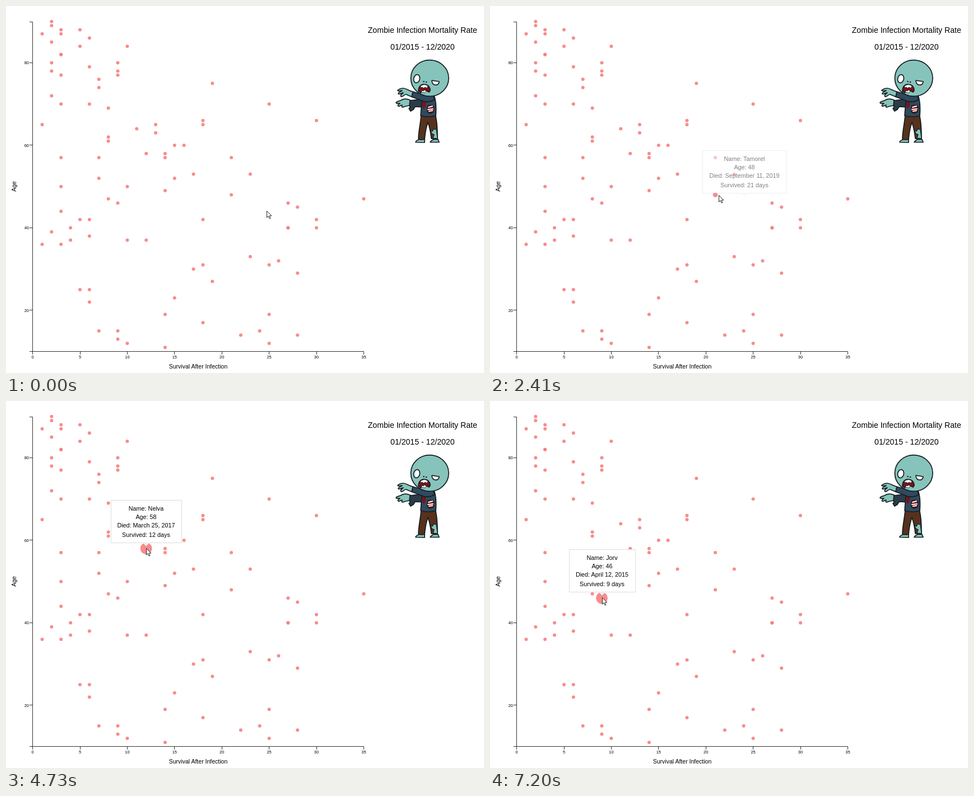
An HTML page for the animation above (8000 ms loop, 853x656 px).

```html
<!DOCTYPE html>
<html lang="en">
<head>
<meta charset="utf-8">
<title>Zombie Infection Mortality Rate</title>
<style>
  html, body { margin: 0; width: 100%; height: 100%; overflow: hidden; background: #fff; }
  svg { display: block; font-family: "Liberation Sans", Arial, sans-serif; text-anchor: middle; }
  #axes path { fill: none; stroke: #000; stroke-width: .8; }
  #axes text { font-size: 7.5px; }
  .label { font-size: 10.5px; }
  .title { font-size: 14.1px; }
  #dots { fill: #f77f7f; fill-opacity: .9; }
  #tip { font-size: 10.8px; }
  #tip rect { fill: #fff; stroke: #ddd; }
  #zombie { stroke: #141c20; stroke-width: 1.7; stroke-linejoin: round; stroke-linecap: round; }
  .skin { fill: #86c4bb; }
  .coat { fill: #2f4a5e; }
  .rag { fill: #2b3b48; }
  .blood { fill: #7a1219; }
  .trousers { fill: #57321d; }
  .white { fill: #fff; }
</style>
</head>
<body>
<svg width="853" height="656" viewBox="0 0 853 656">
  <g id="axes"></g>
  <text class="label" x="343" y="648">Survival After Infection</text>
  <text class="label" transform="translate(17.5 322.5) rotate(-90)">Age</text>
  <text class="title" x="743.3" y="47.5">Zombie Infection Mortality Rate</text>
  <text class="title" x="743.3" y="77.5">01/2015 - 12/2020</text>

  <g id="zombie">
    <path class="skin" d="M731 243.5c0-3 4-4 7-5h9v5.500zM757 243.500c1-3 4-4 6-5h8l2 5z"/>
    <path class="trousers" d="M741 194c-1 15-5 29-5 44q6 2 11 0c1-11 3-22 6-30 3 9 5 19 6 29l11 1c0-15 0-30-4-44z"/>
    <path class="skin" d="M757 222l4 2 2-4 5 1 2 16-8-1 2-6-4-2z" stroke-width="1.2"/>
    <path class="rag" d="M746 166l-26 3-1 9 3 2-3 3 3 5 5-3 3-5 16 1z"/>
    <path class="skin" d="M721 168c-7-3-13-2-17 1-3 1-8 2-8 4 1 2 5 1 7 1-2 2-5 3-3 5 2 1 5-2 7-2-1 2-1 4 1 4 3-1 4-2 12-3z"/>
    <path class="coat" d="M745 160c-4 12-4 23-5 36q14 4 27 0c1-13 1-25-3-36z"/>
    <path class="blood" d="M744 169l6 1-1 8-3 6-3-2z" stroke="none"/>
    <path class="coat" d="M748 159l-23-6-2 9 24 9q12 1 18-4l-3-8z"/>
    <path class="skin" d="M726 153c-8-1-11-6-17-6-4 0-9 2-10 4 1 2 5 0 8 0-3 2-8 4-7 6 2 2 6-2 9-2-3 2-6 5-4 7 3 1 5-4 9-4 4 2 7 3 10 4z"/>
    <path class="blood" d="M752 179c4-3 10-2 12 1l-1 9q-6 5-11 0z" stroke-width="1.2"/>
    <path d="M754 181l7-2M753 185l9-1M755 188l6-1" stroke="#fff" stroke-width="2"/>
    <ellipse class="skin" cx="756.2" cy="129" rx="33.800" ry="32.300"/>
    <ellipse class="white" cx="733" cy="130" rx="5.4" ry="7.5" transform="rotate(12 733 130)"/>
    <path class="white" d="M760 133l13 2c0 4-3 7-7 6-4 0-6-4-6-8z"/>
    <path d="M745.5 135h.1M750 136h.1" stroke-width="2.4"/>
    <path class="blood" d="M736 152c0-8 5-13 11-12 6 0 10 5 10 11l-2 3-4-2q-6-2-11 3z"/>
    <path class="white" d="M740 143q6-5 13 0l-2 4-3-2-3 2-2-2-3 1zM741 154l2-3 2 1 2-2 3 2-2 3z" stroke-width=".8"/>
  </g>

  <g id="dots"></g>
  <g id="tip">
    <rect y="-86.5" height="76"/>
    <path d="M-6-10.5H6L0-4.5z" fill="#f2f2f2"/>
    <text y="-68.5"></text><text y="-53.5"></text><text y="-38"></text><text y="-21"></text>
  </g>
  <path id="cursor" d="M.5.5V12.2l2.7-2.5 2 4.400 1.800-.8-2-4.300H8.900z" fill="#fff" stroke="#111" stroke-width=".9"/>
</svg>

<script>
const $ = id => document.getElementById(id);
const px = days => 47.6 + days * 16.88;
const py = age => 617.7 - (age - 10) * 7.375;
const pixel = v => Math.floor(v) + .5;

function add(parent, tag, attrs, text = '') {
  const el = document.createElementNS('http://www.w3.org/2000/svg', tag);
  for (const key in attrs) el.setAttribute(key, attrs[key]);
  el.textContent = text;
  return parent.appendChild(el);
}

// The plotted data: ages at death, indexed by days survived.
const ages = [
  [], [87, 65, 36], [90, 89, 85, 80, 78, 72, 39],
  [88, 87, 82, 82, 77, 70, 57, 50, 44, 36], [40, 37], [88, 84, 42, 25],
  [86, 79, 70, 42, 38, 25, 22], [76, 74, 57, 52, 15], [69, 62, 61, 47],
  [80, 78, 77, 46, 15, 13], [84, 50, 37, 12], [64], [58, 37], [65, 63],
  [58, 57, 49, 19, 11], [60, 52, 23], [60], [53, 30], [66, 65, 42, 31, 17],
  [75, 27], [], [57, 48], [14], [53, 33], [15], [70, 31, 19, 12], [32],
  [46, 40, 40], [45, 29, 14], [], [66, 42, 40], [], [], [], [], [47]
];
const dots = {};
ages.forEach((list, days) => list.forEach(age => {
  dots[[days, age]] = add($('dots'), 'circle', { cx: px(days), cy: py(age), r: 3 });
}));

let axisPath = `M42 ${pixel(py(90)) + 1}H47.5V617.5H42M47.5 617.5H${pixel(px(35))}`;
for (let days = 0; days <= 35; days += 5) {
  axisPath += `M${pixel(px(days))} 617.5v5.5`;
  add($('axes'), 'text', { x: px(days), y: 630 }, days);
}
for (let age = 20; age <= 80; age += 20) {
  axisPath += `M47.5 ${pixel(py(age))}h-5.5`;
  add($('axes'), 'text', { x: 41, y: py(age) + 2.8, 'text-anchor': 'end' }, age);
}
add($('axes'), 'path', { d: axisPath });

// The pointer passes "via" and settles on the dot at "show", then leaves it at "hide".
const hovers = [
  { days: 27, age: 46, via: { t: 0, x: 465, y: 366 }, show: 612, hide: 1310,
    width: 150, name: 'Brelvan', died: 'September 30, 2015' },
  { days: 21, age: 48, via: { t: 1465, x: 484, y: 351 }, show: 2472, hide: 3402,
    width: 150, name: 'Tamorel', died: 'September 11, 2019' },
  { days: 12, age: 58, via: { t: 3945, x: 276, y: 272 }, show: 4720, hide: 6037,
    width: 126, name: 'Nelva', died: 'March 25, 2017' },
  { days: 9, age: 46, via: { t: 6425, x: 221, y: 320 }, show: 7200, hide: 9000,
    width: 118, name: 'Jorv', died: 'April 12, 2015' }
];
const path = hovers.flatMap(h => {
  const rest = { x: px(h.days), y: py(h.age) - 1 };
  return [h.via, { t: h.show, ...rest }, { t: h.hide - 70, ...rest }];
});

const mix = (a, b, p) => a + (b - a) * p;
const ramp = (t, start) => Math.min(1, Math.max(0, (t - start) / 150));
const ease = p => p < .5 ? 4 * p ** 3 : 1 - 4 * (1 - p) ** 3;
// The screen refreshes every 77.5 ms.
const tick = t => Math.max(0, 70 + 77.5 * Math.floor((t - 70) / 77.5));

function move(el, x, y) {
  el.setAttribute('transform', `translate(${Math.round(x)} ${Math.round(y)})`);
}

function drawTip(t) {
  let index = 0;
  hovers.forEach((h, i) => { if (t >= h.show - 150) index = i; });
  const h = hovers[index], from = hovers[index - 1] || hovers[1];
  const shown = ramp(t, h.show - 150);
  const tip = $('tip'), box = tip.querySelector('rect');
  move(tip, mix(px(from.days), px(h.days), shown), mix(py(from.age), py(h.age), shown));
  tip.setAttribute('opacity', shown * (1 - ramp(t, h.hide + 22)));
  box.setAttribute('x', .5 - h.width / 2);
  box.setAttribute('width', h.width);
  const lines = [`Name: ${h.name}`, `Age: ${h.age}`, `Died: ${h.died}`, `Survived: ${h.days} days`];
  tip.querySelectorAll('text').forEach((el, i) => { el.textContent = lines[i]; });
}

function draw(now) {
  const t = tick(now % 8000);
  const next = path.findIndex(k => k.t > t);
  const a = path[next - 1], b = path[next], p = (t - a.t) / (b.t - a.t);
  move($('cursor'), mix(a.x, b.x, p), mix(a.y, b.y, p));
  for (const h of hovers) {
    const grown = ease(ramp(t, h.show - 130)) - ease(ramp(t, h.hide + 105));
    dots[[h.days, h.age]].setAttribute('r', 3 + 7.5 * grown);
  }
  drawTip(t);
  requestAnimationFrame(draw);
}
requestAnimationFrame(draw);
</script>
</body>
</html>
```
